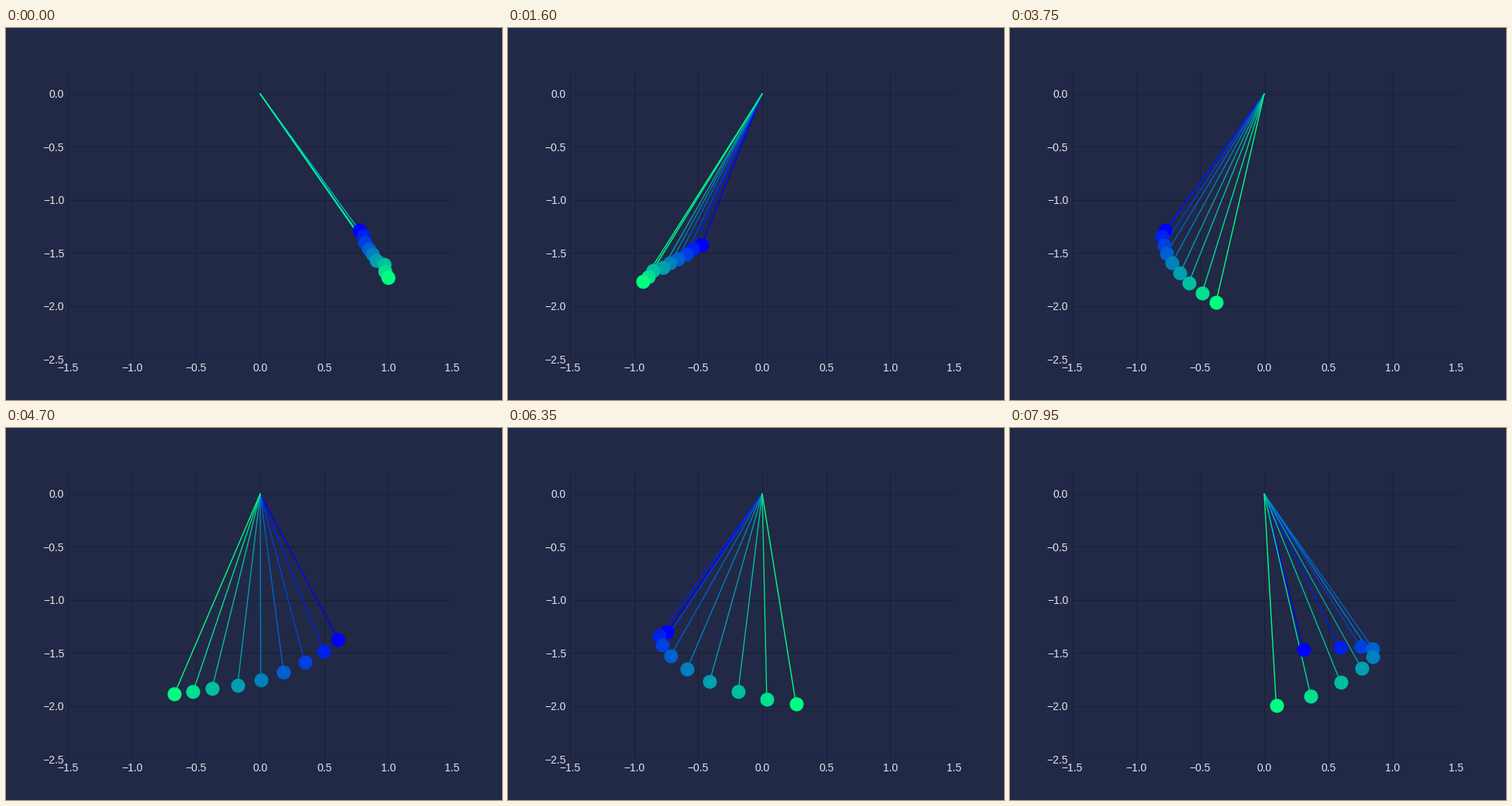
A matplotlib script for the animation above (8000 ms loop, 640 by 480 pixels).

```python
import numpy as np
import matplotlib.pyplot as plt
from matplotlib.animation import FuncAnimation

FRAMES, INTERVAL = 160, 50
G, DT = 9.81, INTERVAL / 1000

BACK, GRID, TEXT = "#212946", "#1a2038", "0.9"

lengths = np.linspace(1.5, 2.0, 9)
start = np.radians([31.0, 31.05, 30.12, 30.22, 30.1, 30.02, 31.0, 30.2, 30.0])
colors = plt.cm.winter(np.linspace(0, 1, len(lengths)))


def simulate():
    """Angles of all pendulums per frame, semi-implicit Euler."""
    angle, speed = start.copy(), np.zeros_like(start)
    track = []
    for _ in range(FRAMES):
        track.append(angle.copy())
        speed -= G / lengths * np.sin(angle) * DT
        angle += speed * DT
    return np.array(track)


angles = simulate()

plt.rcParams.update({
    "font.family": "Liberation Sans",
    "font.size": 10,
    "toolbar": "None",
})

fig, ax = plt.subplots(figsize=(6.4, 4.8), dpi=100, facecolor=BACK)
ax.set_facecolor(BACK)
ax.set_xlim(-1.5, 1.5)
ax.set_ylim(-2.5, 0.2)
ax.set_axisbelow(True)
ax.grid(color=GRID, linewidth=0.8)
ax.tick_params(length=0, pad=3.5, labelcolor=TEXT)
ax.spines[:].set_visible(False)

rods = [ax.plot([], [], color=c, lw=1, solid_capstyle="round", zorder=2)[0]
        for c in colors]
bobs = [ax.plot([], [], "o", color=c, ms=12, zorder=3)[0] for c in colors]


def update(frame):
    xs = lengths * np.sin(angles[frame])
    ys = -lengths * np.cos(angles[frame])
    for rod, bob, x, y in zip(rods, bobs, xs, ys):
        rod.set_data([0, x], [0, y])
        bob.set_data([x], [y])
    return rods + bobs


anim = FuncAnimation(fig, update, frames=FRAMES, interval=INTERVAL,
                     repeat=True, repeat_delay=0)
plt.show()
```
